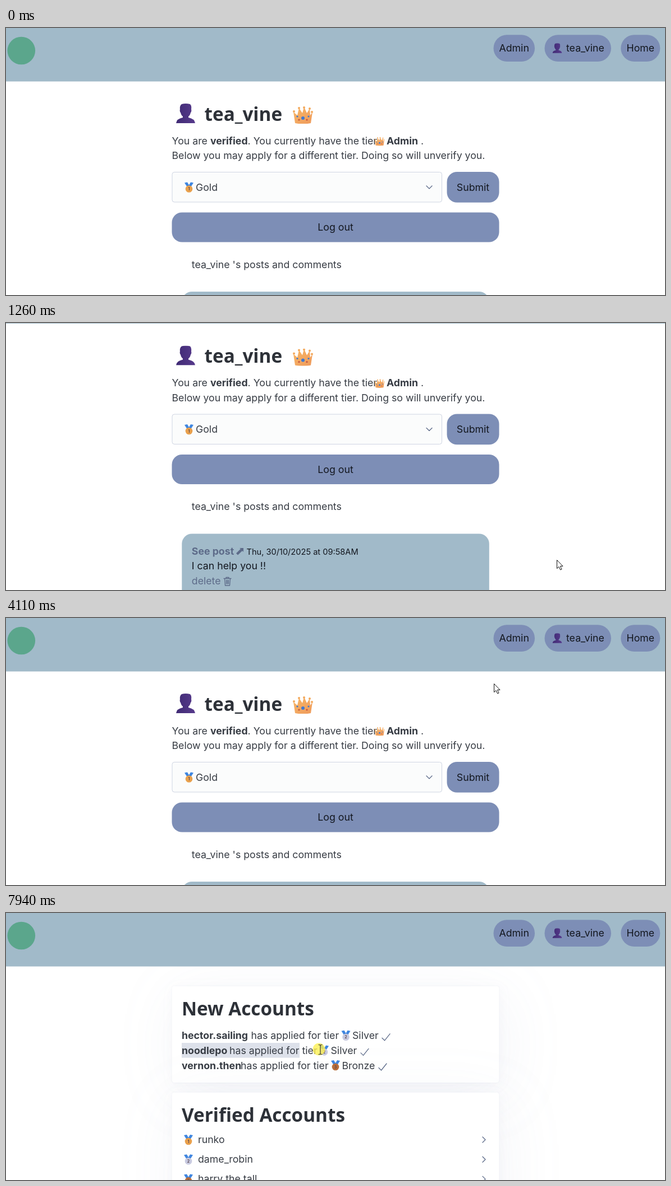
These frames come from a looping animation (1174x477 px, 8000 ms). An HTML page:

```html
<!DOCTYPE html>
<html lang="en">
<head>
<meta charset="utf-8">
<title>Account tiers</title>
<style>
html, body { margin: 0; width: 100%; height: 100%; overflow: hidden; background: #fff; }
svg { display: block; }
text { font: 17.73px Inter, sans-serif; fill: #373c44; white-space: pre; }
.b { font-weight: 700; }
.h { font: 700 33.3px "Noto Sans", sans-serif; fill: #2d3138; }
.k { fill: #13171f; }
.s { font-size: 14.6px; fill: #13171f; }
.link { fill: #5d6b89; }
.mid { text-anchor: middle; }
.num { font: 700 7px Inter, sans-serif; text-anchor: middle; fill: #5b4a55; }
.line { fill: none; stroke: #5d6b89; stroke-width: 1.3; stroke-linecap: round; stroke-linejoin: round; }
.btn { fill: #7d8eb6; }
.bar { fill: #a1bac9; }
.card { fill: #fff; filter: drop-shadow(0 0 1px rgba(129,145,181,.12)) drop-shadow(2px 4px 10px rgba(129,145,181,.05)) drop-shadow(9px 18px 53px rgba(129,145,181,.08)); }
.sel { fill: #dde1ea; }
</style>
</head>
<body>
<svg id="stage" width="1174" height="477" viewBox="0 0 1174 477">
  <defs>
    <linearGradient id="violet"><stop offset="0" stop-color="#3f2a74"/><stop offset="1" stop-color="#573a8c"/></linearGradient>
    <linearGradient id="amber" y2="1"><stop offset="0" stop-color="#f8b765"/><stop offset="1" stop-color="#ee9a5c"/></linearGradient>
    <symbol id="bust" viewBox="0 0 34 35">
      <path fill="url(#violet)" d="M10 1Q17-1 25 1Q28 4 27 10Q28 14 26 16Q25 21 22 23V25Q33 27 34 35H0Q1 27 12 25V23Q9 21 8 16Q6 14 7 10Q6 4 10 1Z"/>
    </symbol>
    <symbol id="crown" viewBox="0 0 36 31">
      <path fill="url(#amber)" d="M4 30L1 10L8 16L11 3L17 12L20 1L25 12L30 4L31 16L35 10L32 30Q18 33 4 30Z"/>
      <g fill="#f3a95c"><circle cx="2" cy="9" r="2"/><circle cx="11" cy="3" r="2"/><circle cx="20" cy="2" r="2"/><circle cx="30" cy="4" r="2"/><circle cx="34" cy="10" r="2"/></g>
      <g fill="#3f78cf"><circle cx="18" cy="21" r="3"/><circle cx="8" cy="18" r="1.6"/><circle cx="28" cy="18" r="1.6"/></g>
      <g fill="#c5533f"><circle cx="11" cy="24" r="1.6"/><circle cx="25" cy="24" r="1.6"/></g>
    </symbol>
  </defs>
  <g id="profile"></g>
  <g id="admin"></g>
  <g id="head"></g>
  <circle id="spot" r="11" fill="#fdf04f" fill-opacity=".78"/>
  <g id="arrow"><path fill="#fff" stroke="#111" d="M.5 .5V15.6L4 12.4L6.6 18L9 17L6.5 11.4H11Z"/></g>
  <g id="hand"><path fill="#fff" stroke="#111" d="M-1.5 13V2Q-1.5 .5 0 .5T1.8 2V8Q4.5 6.6 5 8.6Q7.4 7.6 7.8 9.6Q10 9 10 11V15Q10 18 8 20.5H-1Q-2-.0-1 20.5Q-3 17-5 13.5Q-5.8 11.6-4.4 11Q-3 11-1.5 13Z"/><path fill="none" stroke="#111" d="M1.8 8V11M5 9V11.5M7.8 10V12"/></g>
  <g id="beam"><path fill="none" stroke="#333" stroke-width="1.2" d="M-3.5-8.5H-1L0-7.5L1-8.5H3.5M0-7.5V7.5M-3.5 8.5H-1L0 7.5L1 8.5H3.5"/></g>
</svg>
<script>
const $ = id => document.getElementById(id);
const LOOP = 8000, USER = 'tea_vine';
const text = (x, y, str, cls = '') => `<text x="${x}" y="${y}" class="${cls}">${str}</text>`;
const box = (x, y, w, h, r, cls) => `<rect x="${x}" y="${y}" width="${w}" height="${h}" rx="${r}" class="${cls}"/>`;
const icon = (name, x, y, w, h) => `<use href="#${name}" x="${x}" y="${y}" width="${w}" height="${h}"/>`;
const line = (x, y, d) => `<path class="line" transform="translate(${x} ${y})" d="${d}"/>`;
const METAL = ['', '#e9a04c', '#c8cae0', '#b96f3c'];
const medal = (x, y, n) => `<g transform="translate(${x} ${y})"><path fill="#3f86e0" d="M0 1L5 0L8 5L11 0L16 1L11 9H5Z"/><path fill="#2a62b4" d="M5 6H11V9H5Z"/><circle cx="8" cy="12" r="6.3" fill="${METAL[n]}"/><text x="8" y="14.6" class="num">${n}</text></g>`;

$('profile').innerHTML =
  '<rect id="selA" class="sel" x="295.5" y="188" height="26.6"/>' +
  icon('bust', 303, 135, 34, 35) + text(353.5, 165.5, USER, 'h') + icon('crown', 511, 140, 36, 31) +
  text(295.5, 207.7, 'You are <tspan class="b">verified</tspan>. You currently have the tier') +
  icon('crown', 656.5, 194.5, 18, 16) + text(678, 207.7, '<tspan class="b">Admin</tspan> .') +
  text(295.5, 234.3, 'Below you may apply for a different tier. Doing so will unverify you.') +
  '<rect x="296" y="257.5" width="480.5" height="53.5" rx="4" fill="#fbfcfc" stroke="#cfd5e2"/>' +
  medal(318, 275.5, 1) + text(338, 290.8, 'Gold') + line(749, 282, 'M0 0L5 5L10 0') +
  box(785.5, 257, 93, 54.8, 18, 'btn') + text(832, 290.8, 'Submit', 'mid k') +
  box(295.5, 329.5, 583, 53, 18, 'btn') + text(587, 362.2, 'Log out', 'mid k') +
  text(330.8, 428.7, USER + " 's posts and comments") +
  box(313.3, 471, 547.5, 180, 18, 'bar') +
  text(330.8, 508.2, 'See post', 'b link') +
  '<path class="link" d="M410 506L418 498L416 496.500H423V503.500L421 501.500L413 509Z"/>' +
  text(428.5, 508.2, 'Thu, 30/10/2025 at 09:58AM', 's') +
  text(330.8, 534.9, 'I can help you !!', 'k') + text(330.8, 561.2, 'delete', 'link') +
  line(388, 548, 'M0 3H13M4 3V1H9V3M1.5 3L2.500 15.500H10.500L11.500 3M4.500 6V12.500M6.500 6V12.500M8.500 6V12.500');

// One applicant line: bold name, request text, medal, tier, tick
const request = (y, name, x, n, tier, tick) =>
  text(313, y, name, 'b') + text(x, y, 'has applied for tier') + medal(x + 161, y - 15.500, n) +
  text(x + 180.5, y, tier) + line(tick, y - 4, 'M0 2L4.500 6.500L14-5.500');
const account = (y, n, name) =>
  medal(317, y - 15, n) + text(342, y, name) + line(849, y - 11, 'M0 0L5 5L0 10');

$('admin').innerHTML =
  box(295.5, 130.5, 583, 172.500, 4.400, 'card') + box(295.5, 320.500, 583, 400, 4.400, 'card') +
  '<rect id="selB" class="sel" x="313" y="232" height="26.6"/>' +
  text(313, 182.5, 'New Accounts', 'h') +
  request(225.3, 'hector.sailing', 436.5, 2, 'Silver', 670) +
  request(251.9, 'noodlepo', 398, 2, 'Silver', 632) +
  request(278.5, 'vernon.then', 418, 3, 'Bronze', 664) +
  text(313, 372.5, 'Verified Accounts', 'h') +
  account(411, 1, 'runko') + account(446.2, 2, 'dame_robin') + account(481.400, 3, 'harry the tall');

$('head').innerHTML =
  box(0, 0, 1174, 95.5, 0, 'bar') + '<circle id="logo" cx="27.3" cy="40.5" r="24.8" fill="#5ba68c"/>' +
  '<rect id="ring" x="867.500" y="11.500" width="75.500" height="49.500" rx="24.700" fill="none" stroke="#8294ba" stroke-width="2"/>' +
  box(868.5, 12.3, 73.5, 47.7, 23.8, 'btn') + box(959.5, 12.3, 118.5, 47.7, 23.8, 'btn') + box(1095.3, 12.3, 70, 47.7, 23.8, 'btn') +
  text(905.2, 42.400, 'Admin', 'mid k') + icon('bust', 973.500, 27, 17, 18) +
  text(998, 42.400, USER, 'k') + text(1130.3, 42.400, 'Home', 'mid k');

// Pointer moves: start, end, number of steps, way points
const moves = [
  [260, 460, 4, [1058, 466], [1000, 433], [981, 423]],
  [1600, 1730, 3, [830, 375], [600, 295], [533, 273]],
  [1990, 2410, 7, [510, 262], [390, 222], [310, 203], [299, 200]],
  [2610, 3120, 8, [299, 199], [318, 195], [380, 187], [455, 182], [545, 184], [642, 190], [668, 189], [683, 188]],
  [3320, 3650, 5, [704, 190], [742, 190], [758, 190], [758, 190], [758, 190]],
  [3910, 4650, 11, [766, 184], [850, 130], [945, 65], [987, 32], [980, 22], [940, 26], [912, 40]],
  [5240, 5240, 1, [911, 39]],
  [6010, 6280, 4, [820, 75], [640, 160], [535, 212], [513, 221]],
  [6480, 7260, 12, [505, 222], [440, 232], [360, 244], [312, 248], [312, 248]],
  [7330, 7940, 9, [313, 246], [335, 239], [420, 235], [510, 239], [560, 244]]
];
const scrolls = [[0, 0], [790, 22], [860, 76], [930, 94.5], [1330, 30], [1400, 0]];
const presses = [[2610, 3480], [3560, 3650], [4720, 4930], [7330, LOOP]];
const wordsA = [328, 361, 427, 435, 471, 547, 591, 622, 653, 676, 733];
const wordsB = [393, 398, 431, 494, 523, 558];

function pointer(t) {
  const m = moves.filter(v => v[0] <= t).pop();
  if (!m) return null;
  const [t0, t1, n, ...pts] = m;
  const gap = n > 1 ? (t1 - t0) / (n - 1) : 1;
  let i = 0;
  while (i < n - 1 && Math.floor((t0 + gap * (i + 1)) / 10) * 10 <= t) i++;
  const u = n > 1 ? i / (n - 1) * (pts.length - 1) : 0;
  const a = Math.floor(u), p = pts[a], q = pts[Math.min(a + 1, pts.length - 1)];
  return p.map((v, k) => v + (q[k] - v) * (u - a));
}

const within = (v, a, b) => v >= a && v < b;
function shape([x, y], second) {
  if (within(y, 12, 60) && (within(x, 868, 942) || within(x, 960, 1078))) return 'hand';
  const over = second ? within(x, 312.5, 690) && within(y, 208, 283)
                      : within(x, 295, 742) && within(y, 192, 239);
  return over ? 'beam' : 'arrow';
}

const show = (id, on) => $(id).style.display = on ? '' : 'none';
function select(id, start, words, x, on) {
  const end = words.filter(w => w <= x - 19).pop() || start;
  $(id).setAttribute('width', on ? end - start : 0);
}

function draw(t) {
  const second = t >= 5480;
  const y = scrolls.filter(s => s[0] <= t).pop()[1];
  for (const id of ['profile', 'head']) $(id).setAttribute('transform', `translate(0 ${-y})`);
  show('profile', !second);
  show('admin', second);
  show('logo', !within(t, 5480, 5680));
  $('ring').style.opacity = second ? 0 : Math.max(0, Math.min(1, (t - 4650) / 280));

  const p = pointer(t), kind = p && shape(p, second);
  for (const id of ['arrow', 'hand', 'beam']) {
    show(id, id === kind);
    if (id === kind) $(id).setAttribute('transform', `translate(${p})`);
  }
  show('spot', presses.some(([a, b]) => within(t, a, b)));
  if (!p) return;
  $('spot').setAttribute('cx', p[0] - (kind === 'beam' ? 2.500 : .5));
  $('spot').setAttribute('cy', p[1] - .5);
  select('selA', 295.5, wordsA, p[0], within(t, 2610, 3560));
  select('selB', 313, wordsB, p[0], t >= 7330);
}

function tick() {
  draw(performance.now() % LOOP);
  requestAnimationFrame(tick);
}
tick();
</script>
</body>
</html>
```
